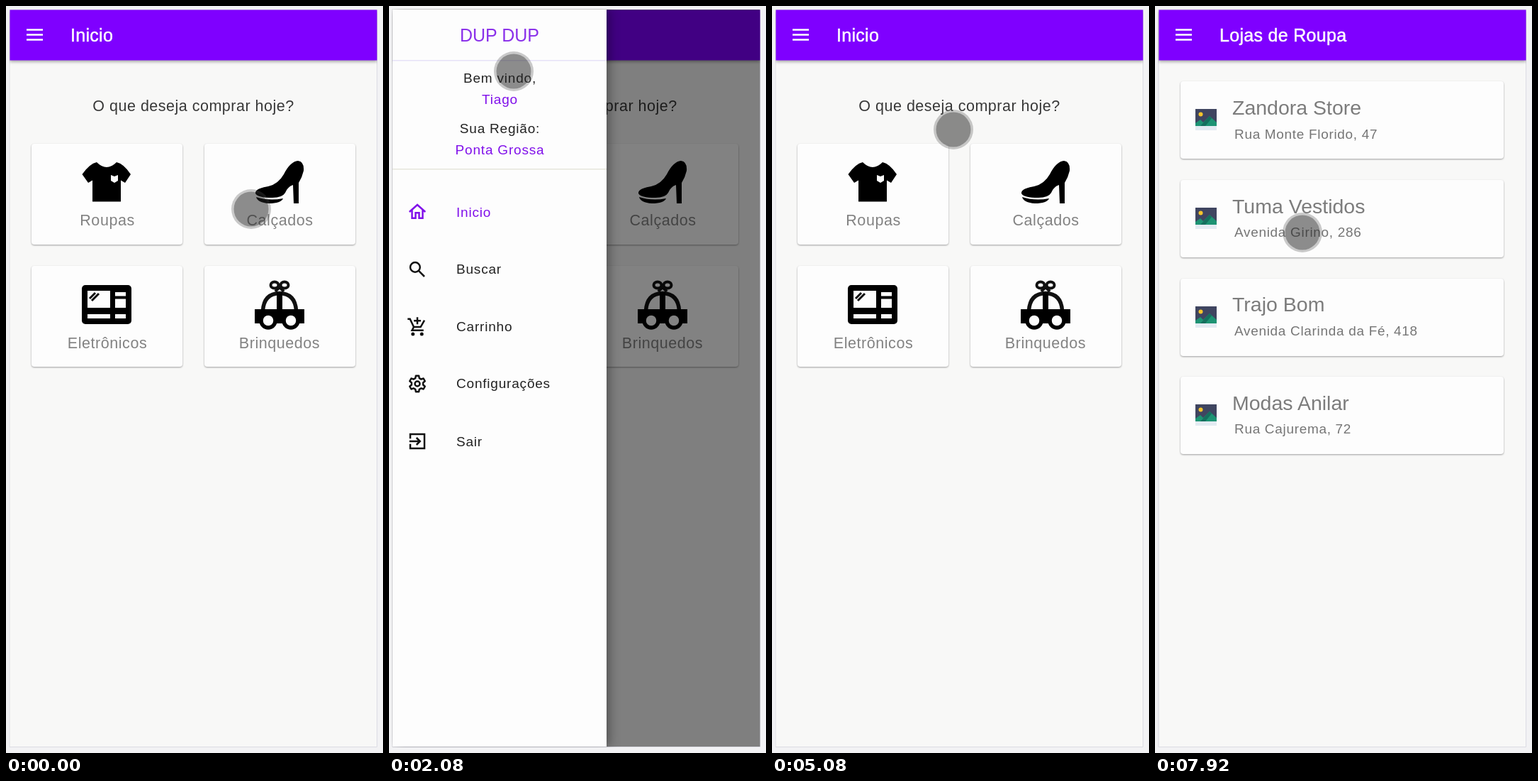
An HTML page for the animation above (8 s loop, 532x1052 px).

```html
<!DOCTYPE html>
<html lang="pt-BR">
<head>
<meta charset="utf-8">
<title>Loja</title>
<style>
html, body { margin: 0; width: 100%; height: 100%; overflow: hidden; background: #f2f2f4; }
svg.stage { display: block; width: 532px; height: 1052px; font-family: "Liberation Sans", Arial, sans-serif; }
.page { fill: #f8f8f7; }
.bar { fill: #7f00ff; filter: drop-shadow(0 2px 2px rgba(0,0,0,.35)); }
.title { font-size: 25px; letter-spacing: .3px; fill: #fff; stroke: #fff; stroke-width: .5px; }
.burger { stroke: #fff; stroke-width: 2.4; }
.mid { text-anchor: middle; }
.ask { font-size: 21.5px; letter-spacing: .5px; fill: #383838; }
.label { font-size: 21.5px; letter-spacing: .55px; fill: #828282; }
.card { fill: #fdfdfd; filter: drop-shadow(0 1.5px 1px rgba(0,0,0,.36)); }
.shop { font-size: 28.5px; fill: #7c7c7c; }
.small { font-size: 19px; letter-spacing: .68px; fill: #757575; }
.brand { font-size: 25px; fill: #8a30ea; }
.menu { font-size: 19px; letter-spacing: .8px; fill: #222; }
.menu .on, .on { fill: #8010ea; }
.line { fill: none; stroke: #111; stroke-width: 2; }
.white { fill: #fdfdfd; }
.drawer { filter: drop-shadow(3px 0 8px rgba(0,0,0,.4)); }

.shade { animation: shade 8s linear infinite; }
.drawer { animation: drawer 8s linear infinite; }
.status { animation: status 8s step-end infinite; }
.shops { animation: shops 8s linear infinite; }
.pointer { animation: move 8s linear infinite; }
.touch { animation: touch 8s step-end infinite; }
.arrow { animation: arrow 8s step-end infinite; }

@keyframes drawer {
  0%, 16.6% { transform: translateX(-330px); animation-timing-function: cubic-bezier(0,0,.2,1); }
  20.4%, 43.75% { transform: none; animation-timing-function: cubic-bezier(.4,0,.6,1); }
  47.4%, 100% { transform: translateX(-330px); }
}
@keyframes shade {
  0%, 16.6% { opacity: 0; }
  20.4%, 43.75% { opacity: .49; }
  47.4%, 100% { opacity: 0; }
}
@keyframes status {
  0% { visibility: hidden; }
  42.7% { visibility: visible; }
  47.8%, 100% { visibility: hidden; }
}
@keyframes shops {
  0%, 77.1% { transform: translateY(40px); opacity: 0; animation-timing-function: cubic-bezier(.36,.66,.04,1); }
  80.6%, 100% { transform: none; opacity: 1; }
}
@keyframes move {
  0%, 1% { transform: translate(346px,286px); animation-timing-function: ease-in-out; }
  14%, 17.5% { transform: translate(53px,49px); animation-timing-function: ease-in-out; }
  26% { transform: translate(176px,92px); animation-timing-function: ease-in; }
  31.3% { transform: translate(152px,225px); animation-timing-function: ease-out; }
  36.5% { transform: translate(130px,600px); animation-timing-function: ease-in-out; }
  41.7%, 53.1% { transform: translate(140px,293px); animation-timing-function: ease-in-out; }
  62.5%, 63.6% { transform: translate(256px,174px); animation-timing-function: ease-out; }
  66.6%, 68.6% { transform: translate(154px,314px); }
  68.75%, 70.8% { transform: translate(172px,284px); }
  71.9%, 73.8% { transform: translate(156px,284px); }
  74%, 77.1% { transform: translate(141px,299px); animation-timing-function: ease-in-out; }
  84.4%, 91% { transform: translate(217px,297px); animation-timing-function: ease-in-out; }
  98%, 100% { transform: translate(208px,319px); }
}
@keyframes touch {
  0% { visibility: visible; }
  79.1% { visibility: hidden; }
  92.7%, 100% { visibility: visible; }
}
@keyframes arrow {
  0% { visibility: hidden; }
  79.1% { visibility: visible; }
  92.7%, 100% { visibility: hidden; }
}
</style>
</head>
<body>
<svg class="stage" viewBox="0 0 532 1052">
  <defs>
    <clipPath id="screen"><path d="M4.500 4.500H524V1044H4.500Z"/></clipPath>
    <g id="base">
      <path class="page" stroke="#dcdce4" d="M5 5.500H523.500V1043.500H5Z"/>
      <path class="bar" d="M5.500 5.500H523.500V76.500H5.500Z"/>
      <path class="burger" d="M29 33.5H52M29 40.5H52M29 47.5H52"/>
    </g>
    <rect id="tile" class="card" width="213" height="142" rx="4"/>
    <g id="shop">
      <rect class="card" x="36" y="106" width="456" height="109" rx="4"/>
      <path fill="#e3ebf2" d="M57 145H87V175H57Z"/>
      <path fill="#3f4560" d="M57 145H87V169H57Z"/>
      <circle cx="64.500" cy="152.500" r="3" fill="#f5c42c"/>
      <path fill="#1d9373" d="M57 169V165L64 160L68 164L77 155L87 164V169Z"/>
      <path fill="#156f5e" d="M64 169L77 155L80 158L71 169Z"/>
    </g>
  </defs>

  <g clip-path="url(#screen)">
    <use href="#base"/>
    <text class="title" x="91" y="50">Inicio</text>
    <text class="ask mid" x="264.500" y="147.500">O que deseja comprar hoje?</text>
    <use href="#tile" x="36" y="194"/>
    <use href="#tile" x="280" y="194"/>
    <use href="#tile" x="36" y="366"/>
    <use href="#tile" x="280" y="366"/>
    <g class="label mid">
      <text x="143" y="309">Roupas</text>
      <text x="386.500" y="309">Calçados</text>
      <text x="143" y="481.500">Eletrônicos</text>
      <text x="386" y="481.500">Brinquedos</text>
    </g>

    <!-- shirt -->
    <path d="M128 220Q142 234 156 220Q166 222 176 237L168 249L162 245.500V275.500H122V245.500L116 249L107.500 237Q118 222 128 220Z"/>
    <path class="white" d="M148 238L153 240L158 238V246L153 249L148 246Z"/>

    <!-- shoe -->
    <path d="M352 264Q351 257 370 254Q384 251 392 237Q401 219 412 218Q421 219 420 232Q418 241 413 249L413 278H406L405 252Q398 254 394 263Q390 270 376 270Q355 270 352 264Z"/>
    <path d="M353 269Q371 275 391 271Q388 278 371 278Q355 277 353 269Z"/>

    <!-- microwave -->
    <rect x="107" y="393" width="70" height="55" rx="5"/>
    <path class="white" d="M115 401H147V425H115ZM154 403H169V408.500H154ZM154 412.500H169V425H154ZM115 434H147V440H115ZM154 434H169V440H154Z"/>
    <path class="line" style="stroke-width:3" d="M118 412L126 404M121 415L131 405"/>

    <!-- toy car -->
    <g class="line" style="stroke-width:4">
      <ellipse cx="379" cy="393" rx="5.500" ry="4.500"/>
      <ellipse cx="393" cy="393" rx="5.500" ry="4.500"/>
      <path d="M386 396L380 402M386 396L392 402"/>
      <path style="stroke-width:5.500" d="M362.500 429Q364 405 386 404.500Q408 405 409.500 429"/>
    </g>
    <path d="M351 427H421V447H351ZM382 403H390V430H382Z"/>
    <g class="white" stroke="#000" stroke-width="5.500">
      <circle cx="370" cy="443" r="10"/>
      <circle cx="402" cy="443" r="10"/>
    </g>

    <g class="shops">
      <use href="#base"/>
      <text class="title" x="91" y="50">Lojas de Roupa</text>
      <use href="#shop"/>
      <use href="#shop" y="139"/>
      <use href="#shop" y="278"/>
      <use href="#shop" y="416"/>
      <g class="shop">
        <text x="109" y="153">Zandora Store</text>
        <text x="109" y="292">Tuma Vestidos</text>
        <text x="109" y="430">Trajo Bom</text>
        <text x="109" y="569">Modas Anilar</text>
      </g>
      <g class="small">
        <text x="112" y="187">Rua Monte Florido, 47</text>
        <text x="112" y="325">Avenida Girino, 286</text>
        <text x="112" y="464">Avenida Clarinda da Fé, 418</text>
        <text x="112" y="602">Rua Cajurema, 72</text>
      </g>
    </g>

    <path class="shade" d="M5 5H523.500V1043H5Z"/>

    <g class="drawer">
      <path class="white" d="M5 5H307V1043H5Z"/>
      <path fill="#e6e2f8" d="M5 76H307V77.500H5Z"/>
      <path fill="#e6e6dc" d="M5 229H307V230.500H5Z"/>
      <text class="brand mid" x="156" y="50">DUP DUP</text>
      <g class="menu mid">
        <text x="156.500" y="108">Bem vindo,</text>
        <text class="on" x="156.500" y="138">Tiago</text>
        <text x="156.500" y="179">Sua Região:</text>
        <text class="on" x="156.500" y="209">Ponta Grossa</text>
      </g>
      <g class="menu">
        <text class="on" x="95" y="297">Inicio</text>
        <text x="95" y="377">Buscar</text>
        <text x="95" y="458">Carrinho</text>
        <text x="95" y="538">Configurações</text>
        <text x="95" y="620">Sair</text>
      </g>
      <g class="line">
        <path style="stroke:#8010ea" transform="translate(25 275) scale(1.25)" d="M3 12L12 4L21 12M6 10V19H10V13H14V19H18V10"/>
        <g transform="translate(25 356) scale(1.25)">
          <circle cx="9.500" cy="9.500" r="5.500"/>
          <path d="M13.500 13.500L20 20"/>
        </g>
        <g transform="translate(25 437) scale(1.25)">
          <path d="M1 3H3.700L8 12H15.700L20 4.500M8 12L6 15.800H19M12 1V9M8 5H16"/>
          <path fill="#111" stroke="none" d="M5 20a2 2 0 1 0 4 0a2 2 0 1 0-4 0M15 20a2 2 0 1 0 4 0a2 2 0 1 0-4 0"/>
        </g>
        <g transform="translate(25 517) scale(1.25)">
          <circle cx="12" cy="12" r="2.800"/>
          <path stroke-linejoin="round" d="M10.300 3H13.700L14.200 5.700L16.300 6.900L18.900 6L20.600 9L18.500 10.800V13.200L20.600 15L18.900 18L16.300 17.100L14.200 18.300L13.700 21H10.300L9.800 18.300L7.700 17.100L5.100 18L3.400 15L5.500 13.200V10.800L3.400 9L5.100 6L7.700 6.900L9.800 5.700Z"/>
        </g>
        <path transform="translate(25 598) scale(1.25)" d="M4 9V4H20V20H4V15M3 12H15M11 8L15 12L11 16"/>
      </g>
    </g>

    <g class="status">
      <path fill="#fbfbfb" stroke="#d5d5d8" d="M4 1005H170Q174 1005 174 1009V1044H4Z"/>
      <text x="15" y="1032" font-size="21" fill="#6b6b6b">Aguardando l...</text>
    </g>
  </g>

  <g class="pointer">
    <g class="touch">
      <circle r="28" fill="#555" fill-opacity=".3"/>
      <circle r="24.500" fill-opacity=".3"/>
    </g>
    <path class="arrow" fill="#fff" stroke="#111" stroke-width="1.600" d="M0 0V27L6 21.500L10.500 32L15.500 30L11 19.500H19.500Z"/>
  </g>
</svg>
</body>
</html>
```
